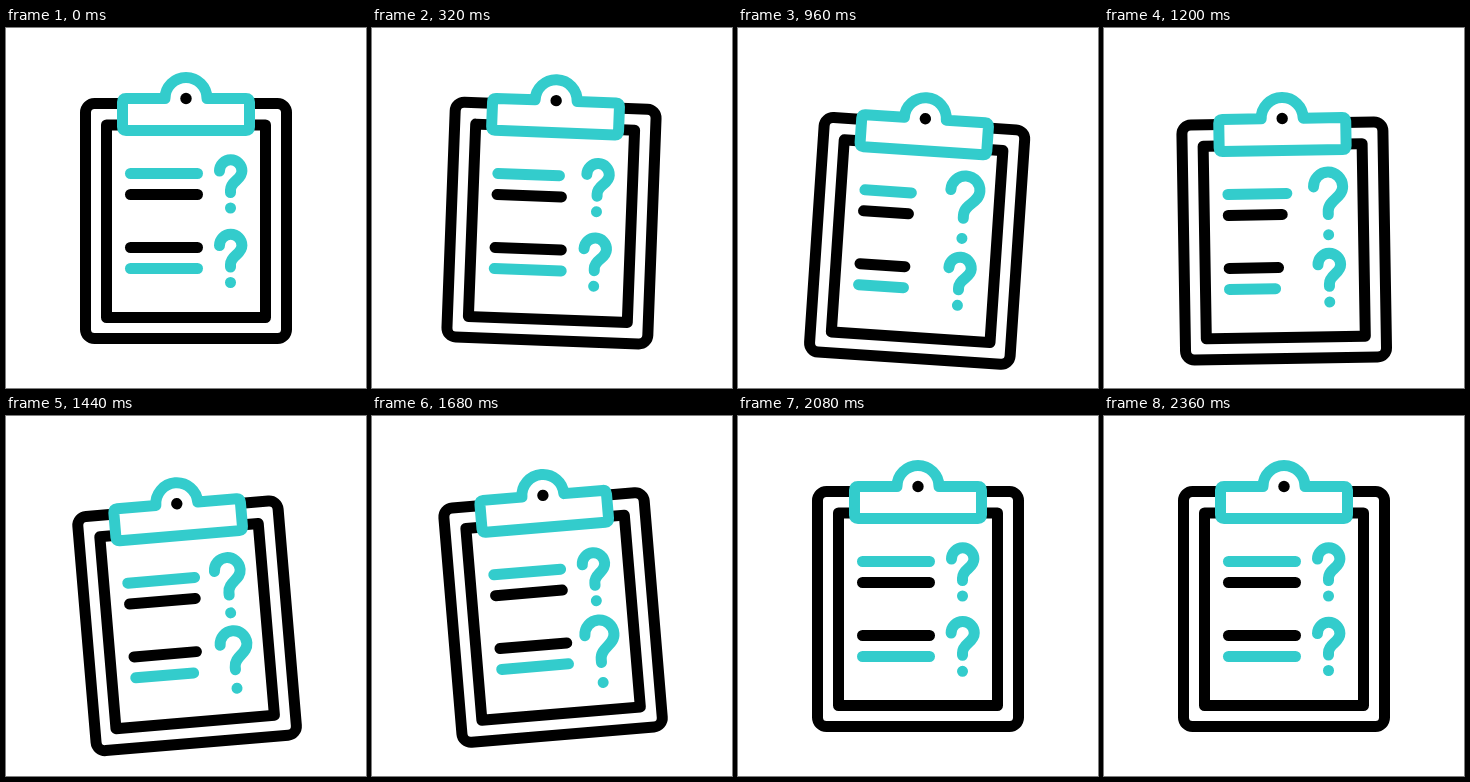
Recreate the animation shown at these times as an HTML page. Size 360 by 360 pixels, loop 2440 ms.

```html
<!DOCTYPE html>
<html lang="en">
<head>
<meta charset="utf-8">
<title>Clipboard with questions</title>
<style>
  html, body { margin: 0; width: 100%; height: 100%; overflow: hidden; background: #fff; }
  svg { display: block; width: 100%; height: 100%; }
  .ink { fill: none; stroke-width: 11; stroke-linecap: round; stroke-linejoin: round; }
  .black { stroke: #000; }
  .teal { stroke: #33cccc; }
</style>
</head>
<body>
<svg viewBox="0 0 360 360">
  <defs>
    <path id="mark" d="M-11,-12A11.2,11.2 0 0 1 .2,-23.2A11.2,11.2 0 0 1 11.4,-12C11.4,-3 0,-2 0,7V9.5M0,25h.01"/>
  </defs>
  <g id="board" class="ink">
    <rect class="black" x="79.5" y="75.5" width="201" height="235" rx="9"/>
    <rect class="black" x="100.5" y="97" width="159" height="192.5"/>
    <path class="row teal"/>
    <path class="row black"/>
    <path class="row black"/>
    <path class="row teal"/>
    <use class="mark teal" href="#mark"/>
    <use class="mark teal" href="#mark"/>
    <path class="teal" fill="#fff" d="M120,70.5H159A21,21 0 0 1 201,70.5H240Q243.5,70.5 243.5,74V99Q243.5,102.5 240,102.5H120Q116.5,102.5 116.5,99V74Q116.5,70.5 120,70.5Z"/>
    <circle cx="180" cy="70.5" r="5.7" fill="#000"/>
  </g>
</svg>
<script>
const LOOP = 2440, STEP = 40;
const board = document.getElementById('board');
const rows = [...document.querySelectorAll('.row')];
const marks = [...document.querySelectorAll('.mark')];
const rowY = [145.5, 166.5, 219.5, 240.5];
const markY = [155, 229.5];
// rise start, rise end, fall start, fall end
const pulses = [[500, 980, 1200, 1680], [1150, 1630, 1690, 2180]];

function ease(t, a, b) {
  const p = Math.min(1, Math.max(0, (t - a) / (b - a)));
  return p * p * (3 - 2 * p);
}

const pulse = (t, a, b, c, d) => ease(t, a, b) - ease(t, c, d);

function draw(t) {
  const drop = 20 * pulse(t, 160, 960, 1240, 2040);
  const tilt = 6 * ease(t, 100, 640) - 11.3 * ease(t, 735, 1540) + 5.3 * ease(t, 1580, 2090);
  board.setAttribute('transform', `translate(0 ${drop}) rotate(${tilt} 180 180)`);

  rows.forEach((row, i) => {
    const up = 140 + 60 * i, down = 870 + 85 * i;
    const end = 191.5 - 22 * pulse(t, up, up + 560, down, down + 560);
    row.setAttribute('d', `M124.5,${rowY[i]}H${end}`);
  });

  marks.forEach((mark, i) => {
    const s = 1 + 0.3 * pulse(t, ...pulses[i]);
    mark.setAttribute('transform', `translate(224.5 ${markY[i]}) scale(${s})`);
    mark.style.strokeWidth = 11 / s;
  });
}

const start = performance.now();
function tick() {
  const t = (performance.now() - start) % LOOP;
  draw(Math.floor(t / STEP) * STEP);
  requestAnimationFrame(tick);
}
tick();
</script>
</body>
</html>
```
